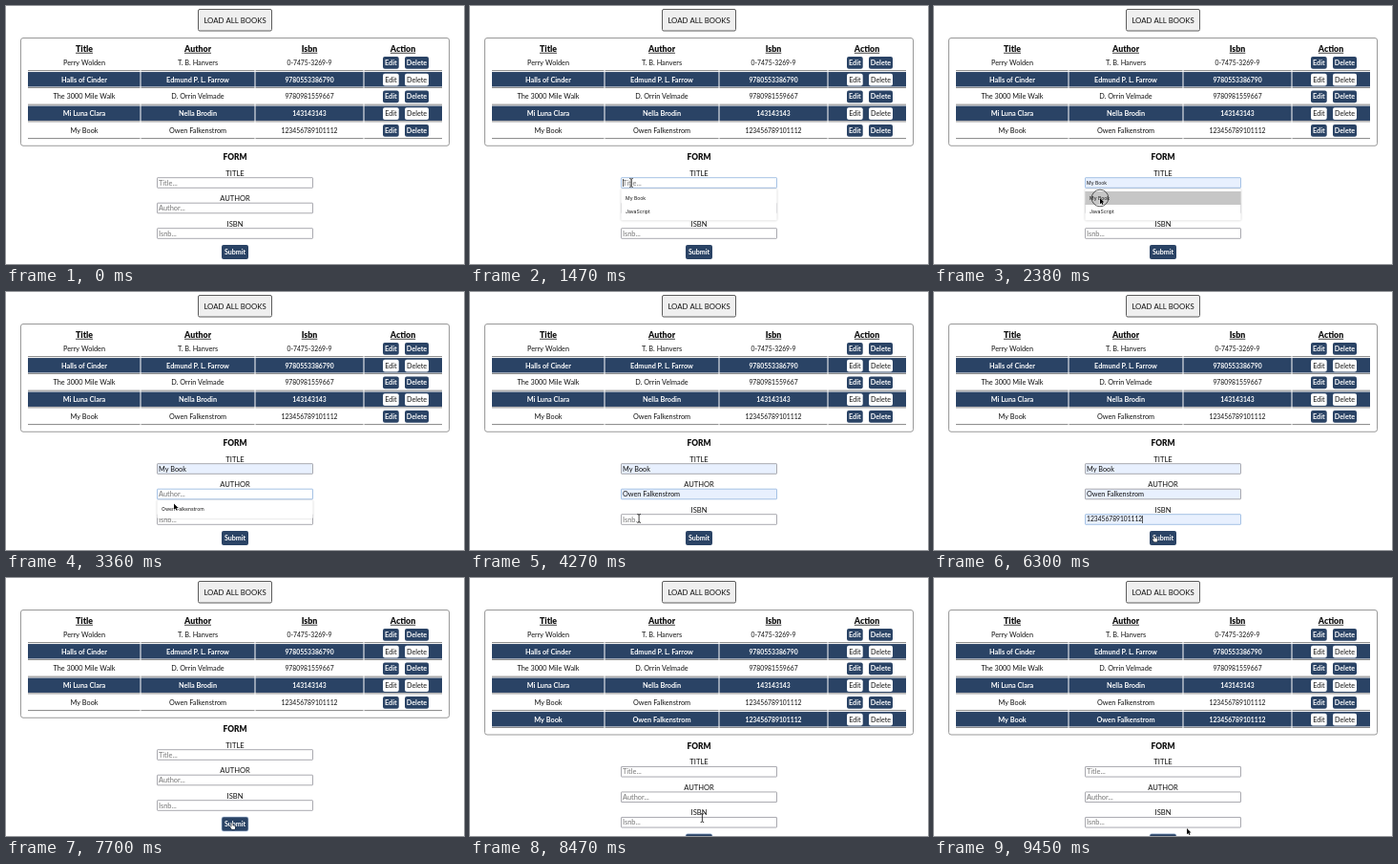
These frames come from a looping animation (480x270 px, 9520 ms). An HTML page with a canvas:

```html
<!DOCTYPE html>
<html lang="en">
<head>
<meta charset="utf-8">
<title>Book list</title>
<style>
  html, body { margin: 0; width: 100%; height: 100%; overflow: hidden; background: #fff; }
  canvas { display: block; width: 480px; height: 270px; }
</style>
</head>
<body>
<canvas id="stage"></canvas>
<script>
const LOOP = 9520, STEP = 70;
const NAVY = '#2a4365', INK = '#111', AUTOFILL = '#e8f0fe';
const SANS = 'Lato, sans-serif', SYSTEM = 'Inter, sans-serif';
const ROW_HEIGHT = 17.75, ROW_ADDED = 7840, CLEARED = 7630, SUBMITTED = 7280;

const canvas = document.getElementById('stage');
const ctx = canvas.getContext('2d');
const scale = window.devicePixelRatio || 1;
canvas.width = 480 * scale;
canvas.height = 270 * scale;

const newBook = ['My Book', 'Owen Falkenstrom', '123456789101112'];
const books = [
  ['Perry Wolden', 'T. B. Hanvers', '0-7475-3269-9'],
  ['Halls of Cinder', 'Edmund P. L. Farrow', '9780553386790'],
  ['The 3000 Mile Walk', 'D. Orrin Velmade', '9780981559667'],
  ['Mi Luna Clara', 'Nella Brodin', '143143143'],
  newBook
];
const columns = [
  { name: 'Title', x: 82, left: 23, right: 140.5 },
  { name: 'Author', x: 201, left: 141.5, right: 260.5 },
  { name: 'Isbn', x: 318, left: 261.5, right: 374.5 },
  { name: 'Action', x: 416, left: 375.5, right: 457 }
];

// Times: focus = click, hover = option highlighted, fill = option chosen, blur = focus lost.
const fields = [
  { label: 'TITLE', hint: 'Title...', y: 179.5, options: [newBook[0], 'JavaScript'], focus: 1260, hover: 2240, fill: 2590, blur: 2800 },
  { label: 'AUTHOR', hint: 'Author...', y: 206, options: [newBook[1]], focus: 2800, hover: 3430, fill: 3710, blur: 4480 },
  { label: 'ISBN', hint: 'Isnb...', y: 232.5, options: [newBook[2]], focus: 4480, hover: 4900, fill: 5250, blur: SUBMITTED }
];
const pointerPath = [
  [0, 212, 280], [700, 169, 185], [1890, 169, 185], [2380, 174, 201],
  [2590, 174, 201], [2800, 176, 212], [3080, 176, 212], [3360, 176, 221.5],
  [3570, 178, 228], [3990, 178, 228], [4340, 177, 238], [4760, 177, 238],
  [5040, 178, 253], [5320, 178, 253], [5670, 229, 252], [5880, 229, 252],
  [6160, 231, 255], [6300, 231, 255], [7210, 237, 256.5], [8330, 237, 256.5],
  [8890, 278, 222], [9030, 278, 222], [9450, 265, 262], [LOOP, 265, 262]
];
const clicks = [[840, 1470], [2380, 2590], [2800, 3010], [3570, 3710], [4340, 4480], [5110, 5250], [7280, 7500]];

const between = (t, start, end) => t >= start && t < end;

function text(str, x, y, { size = 7.3, weight = 400, color = INK, align = 'center', family = SANS } = {}) {
  ctx.font = `${weight} ${size}px ${family}`;
  ctx.fillStyle = color;
  ctx.textAlign = align;
  ctx.fillText(str, x, y + size * 0.36);
  return ctx.measureText(str).width;
}

function box(x, y, w, h, radius, fill, stroke, lineWidth = 1) {
  ctx.beginPath();
  ctx.roundRect(x, y, w, h, radius);
  if (fill) { ctx.fillStyle = fill; ctx.fill(); }
  if (stroke) { ctx.strokeStyle = stroke; ctx.lineWidth = lineWidth; ctx.stroke(); }
}

function rect(x, y, w, h, fill) {
  ctx.fillStyle = fill;
  ctx.fillRect(x, y, w, h);
}

function actionButton(label, x, y, w, inverted) {
  box(x, y - 6.4, w, 12.8, 2, inverted ? '#fff' : NAVY);
  text(label, x + w / 2, y, { size: 7.2, weight: inverted ? 400 : 700, color: inverted ? INK : '#fff' });
}

function drawTable(rows) {
  box(15.5, 33.5, 449, 24 + rows.length * ROW_HEIGHT, 2.5, '#fff', '#999');
  for (const { name, x } of columns) {
    const width = text(name, x, 45, { size: 8.8, weight: 900 });
    rect(x - width / 2, 48.8, width, 0.8, INK);
  }
  rows.forEach((row, i) => {
    const y = 59.3 + i * ROW_HEIGHT, dark = i % 2 === 1;
    columns.forEach(({ x, left, right }, c) => {
      const isbn = c === 2;
      if (dark) rect(left, y - 8, right - left, 15.4, NAVY);
      rect(left, y + 7.9, right - left, 0.9, '#777');
      if (c < 3) {
        text(row[c], x, isbn ? y + 0.2 : y, { size: isbn ? 6.8 : 7.3, weight: dark ? 700 : 400, color: dark ? '#fff' : INK });
      }
    });
    actionButton('Edit', 395, y, 16.7, dark);
    actionButton('Delete', 418, y, 25, dark);
  });
}

function drawField(field, t) {
  const { y } = field, middle = y + 5.4;
  const focused = between(t, field.focus, field.blur);
  const filled = between(t, field.fill, CLEARED);
  const preview = between(t, field.hover, field.fill);
  const value = field.options[0];
  const numeric = field === fields[2];

  text(field.label, 240, y - 4.7, { size: 7.6 });
  box(158.5, y + 0.2, 163, 10.6, 0.5, filled || preview ? AUTOFILL : '#fff', focused ? '#9cbbe2' : '#a0a0a6', 0.9);

  let width = 0;
  if (filled) width = text(value, 160, middle, { size: numeric ? 6.7 : 7.3, align: 'left' });
  else if (preview) text(value, 160, middle + 0.3, { size: 5.1, align: 'left', family: SYSTEM });
  else text(field.hint, 160, middle, { size: 7.4, color: '#757575', align: 'left' });

  const blinkStart = filled ? field.fill : field.focus;
  if (focused && !preview && Math.floor((t - blinkStart) / 500) % 2 === 0) {
    rect(160 + width, y + 1.5, 0.7, 8, INK);
  }
}

function drawDropdown({ y, options, hover }, t) {
  const top = y + 12;
  ctx.save();
  ctx.shadowColor = 'rgba(0,0,0,.25)';
  ctx.shadowBlur = 2 * scale;
  box(158.3, top, 163.4, 5 + 14 * options.length, 1, '#fff');
  ctx.restore();
  if (t >= hover) rect(158.3, top + 2.5, 163.4, 14, '#c6c6c6');
  options.forEach((option, i) =>
    text(option, 163, top + 9.6 + 14 * i, { size: 5.1, align: 'left', family: SYSTEM }));
}

function drawForm(t) {
  text('FORM', 240, 158.2, { size: 8.4, weight: 900 });
  fields.forEach(field => drawField(field, t));
  box(226, 250, 28, 15, 2, NAVY, t >= SUBMITTED ? '#b9cde8' : null, 0.6);
  text('Submit', 240, 257.6, { size: 7.1, weight: 700, color: '#fff' });
  const open = fields.find(field => between(t, field.focus, field.fill));
  if (open) drawDropdown(open, t);
}

function pointerAt(t) {
  const i = Math.max(1, pointerPath.findIndex(([time]) => time >= t));
  const [t0, x0, y0] = pointerPath[i - 1], [t1, x1, y1] = pointerPath[i];
  const p = (t - t0) / (t1 - t0), eased = p * p * (3 - 2 * p);
  return [x0 + (x1 - x0) * eased, y0 + (y1 - y0) * eased];
}

const arrow = new Path2D('M0 0V6.2L1.5 4.9L2.5 7.1L3.5 6.7L2.5 4.5H4.5Z');
const hand = new Path2D('M-.6 .8Q0 0 .6 .8V2.7L2.9 3.2Q3.4 3.5 3.2 4.4L2.7 6.4H-.3L-2 4.1Q-2.1 3.3-1.4 3.5L-.6 4Z');
const beam = new Path2D('M-1.8-4.5Q0-4.5 0-3.4Q0-4.5 1.8-4.5M0-3.4V3.4M-1.8 4.5Q0 4.5 0 3.4Q0 4.5 1.8 4.5');

function drawPointer(t, shift) {
  const [x, y] = pointerAt(t);
  const overField = between(x, 158, 322) && fields.some(f => between(y - shift, f.y, f.y + 11));
  const overButton = between(x, 226, 254) && between(y - shift, 250, 265);
  const press = clicks.find(([start, end]) => between(t, start, end));

  if (press) {
    const releasing = press[1] - t <= 140 && press[1] - press[0] > 140;
    ctx.beginPath();
    ctx.arc(x, y, releasing ? 7.2 : 8.8, 0, Math.PI * 2);
    ctx.strokeStyle = 'rgba(35,35,35,.8)';
    ctx.lineWidth = 0.9;
    ctx.stroke();
  }

  ctx.save();
  ctx.translate(x, y);
  ctx.lineJoin = 'round';
  if (overField) {
    ctx.strokeStyle = INK;
    ctx.lineWidth = 0.8;
    ctx.stroke(beam);
  } else {
    const shape = overButton ? hand : arrow;
    ctx.fillStyle = overButton ? '#fff' : '#000';
    ctx.strokeStyle = overButton ? '#000' : '#fff';
    ctx.lineWidth = 0.8;
    ctx.stroke(shape);
    ctx.fill(shape);
  }
  ctx.restore();
}

function draw(t) {
  const added = t >= ROW_ADDED, shift = added ? ROW_HEIGHT : 0;
  ctx.setTransform(scale, 0, 0, scale, 0, 0);
  rect(0, 0, 480, 270, '#fff');
  box(201.5, 3.5, 77, 22.5, 1.5, '#efefef', '#5c5c5c');
  text('LOAD ALL BOOKS', 240, 15, { size: 7.8 });
  drawTable(added ? [...books, newBook] : books);
  ctx.save();
  ctx.translate(0, shift);
  drawForm(t);
  ctx.restore();
  drawPointer(t, shift);
}

const start = performance.now();
function tick() {
  const t = (performance.now() - start) % LOOP;
  draw(Math.floor(t / STEP) * STEP);
  requestAnimationFrame(tick);
}
tick();
</script>
</body>
</html>
```
